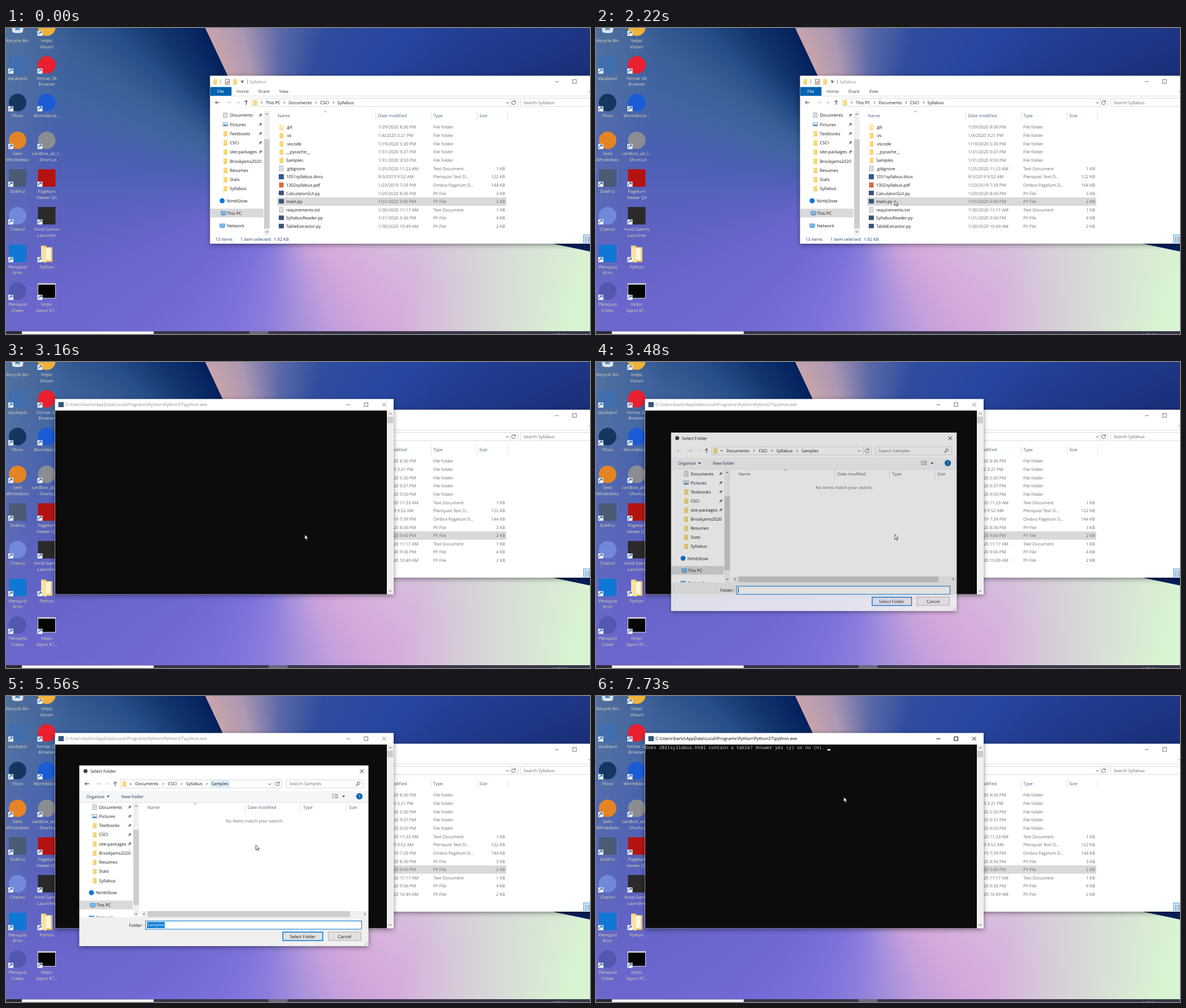
An HTML page for the animation above (8000 ms loop, 1032 px wide and 542 px high).

```html
<!DOCTYPE html>
<html lang="en">
<head>
<meta charset="utf-8">
<title>Folder picker demo</title>
<style>
html, body { margin: 0; width: 100%; height: 100%; overflow: hidden; background: #6a66cc; }
svg {
  display: block;
  background:
    linear-gradient(100deg, rgba(110,135,160,.4), rgba(110,135,160,0) 120px),
    conic-gradient(from 0deg at 484px 281px,
      #5a68a8 0deg, #2f4c9e 16deg, #2746a0 40deg, #1e3786 62deg, #14286e 76deg, #04205c 101.8deg,
      #d8cadc 101.9deg, #d6bedc 115deg, #d6b2dc 130deg, #d4a8dc 145deg,
      #c4a0dc 158deg, #a890dc 172deg, #8c7edc 185deg, #7c72da 200deg, #7069d4 225deg,
      #6a66cc 245deg, #5c62c0 262deg, #4a60b2 280deg, #4265a4 292deg, #3a5f98 303deg,
      #264e88 313deg, #123670 322deg, #03205c 334.8deg,
      #c8a4ac 334.9deg, #ac98b2 346deg, #5a68a8 360deg);
}
text { font: 7.65px "Open Sans", "Noto Sans", sans-serif; text-rendering: geometricPrecision; white-space: pre; }
.mono { font: 8.13px "Noto Sans Mono", "DejaVu Sans Mono", monospace; }
.win { filter: drop-shadow(0 2px 4px rgba(0,0,0,.45)); }
.desk { filter: drop-shadow(.6px .8px .6px rgba(0,0,0,.85)); }
</style>
</head>
<body>
<svg id="stage" width="1032" height="542" viewBox="0 0 1032 542"></svg>
<script>
const LOOP = 8000;
const GRAY = '#6d6d6d', HEAD = '#4c607a', INK = '#1a1a1a';

// Drawing helpers; text is placed by its vertical middle.
const txt = (x, y, s, fill = INK, more = '') => `<text x="${x}" y="${y + 2.8}" fill="${fill}" ${more}>${s}</text>`;
const mid = (x, y, s, fill = INK) => txt(x, y, s, fill, 'text-anchor="middle"');
const box = (x, y, w, h, fill, more = '') => `<rect x="${x}" y="${y}" width="${w}" height="${h}" fill="${fill}" ${more}/>`;
const frame = (x, y, w, h, stroke, fill = '#fff', sw = 1) =>
  box(x + .5, y + .5, w - 1, h - 1, fill, `stroke="${stroke}" stroke-width="${sw}"`);
const dot = (x, y, r, fill) => `<circle cx="${x}" cy="${y}" r="${r}" fill="${fill}"/>`;
const line = (d, stroke = '#555', w = 1) => `<path d="${d}" fill="none" stroke="${stroke}" stroke-width="${w}"/>`;
const fill = (d, c) => `<path d="${d}" fill="${c}"/>`;
const group = (id, body, more = '') => `<g id="${id}" ${more}>${body}</g>`;

const chevron = (x, y, dir, c = '#444', s = 2.2) => {
  const turn = { right: 0, down: 90, left: 180, up: 270 }[dir];
  return `<path transform="translate(${x} ${y}) rotate(${turn})" d="M${-s / 2} ${-s}L${s / 2} 0L${-s / 2} ${s}" fill="none" stroke="${c}"/>`;
};
const arrow = (x, y, dir, c = '#333') => {
  const turn = { left: 0, up: 90, right: 180 }[dir];
  return `<path transform="translate(${x} ${y}) rotate(${turn})" d="M4 0H-3.6M-.6 -3L-3.6 0L-.6 3" fill="none" stroke="${c}"/>`;
};
const caretDown = (x, y) => fill(`M${x - 2.5} ${y - 1.2}h5l-2.5 2.8z`, '#333');
const folder = (x, y, c = '#f8d775') => box(x - 3.5, y - 4.5, 7, 9, c) + box(x - 3.5, y - 4.5, 1.6, 9, '#fbe7a6') + box(x - 3.5, y + 3.8, 7, .8, '#e3b74c');
const page = (x, y) => frame(x - 3.7, y - 4.7, 7.5, 9.5, '#8a8f96', '#fff', .8) +
  line(`M${x - 2} ${y - 2}h4m-4 2h4m-4 2h4`, '#8a9db5', .7);
const picture = (x, y) => frame(x - 5, y - 4, 10, 7.5, '#8aa0b5', '#d8ecfb', .8) + fill(`M${x - 4} ${y + 2.5}l3 -3 2 1.6 1.5 -1 1.5 2.4z`, '#3f7fb0');
const screen = (x, y) => box(x - 4.5, y - 3.5, 9.5, 6.5, '#3f86c4') + box(x - 3.7, y - 2.8, 7.9, 5, '#79bdf0') + box(x - 2.5, y + 3.5, 5.5, 1, '#7a8794');
const refresh = (x, y) => line(`M${x + 2.6} ${y - 2}A3.3 3.3 0 1 0 ${x + 3.3} ${y + .4}M${x + 3.2} ${y - 4}v2.4h-2.4`, '#555');
const pin = (x, y) => line(`M${x - 3} ${y + 3}L${x} ${y}M${x - 2.4} ${y - 1}L${x + 1} ${y + 2.4}`, '#777', .9) +
  fill(`M${x - 1.6} ${y - .4}l2.4 -2.8 2.4 2.4 -2.8 2.4z`, '#777');
const crumbs = (y, ...items) => items.map(([x, s]) => s === '>' ? chevron(x, y, 'right', '#555', 2) : txt(x, y, s)).join('');
const controls = (id, y, ...xs) => `<g id="${id}" fill="none" stroke="#777">` +
  `<path d="M${xs[0]} ${y + .5}h7"/><rect x="${xs[1]}" y="${y - 3}" width="6.5" height="6.5"/>` +
  (xs[2] ? `<path d="M${xs[2]} ${y - 3}l6.5 6.5m0 -6.5l-6.5 6.5"/>` : '') + '</g>';

function desktop() {
  const shapes = {
    bin: (x, y) => fill(`M${x - 13} ${y - 16}h26l-4 25q-9 3 -18 0z`, '#dfe5ea') + fill(`M${x - 5} ${y + 5}l4 -8 6 8z`, '#3d8fd8'),
    round: (x, y, c, r = 15.5) => dot(x, y, r, c),
    square: (x, y, c, s = 31) => box(x - s / 2, y - s / 2, s, s, c),
    files: (x, y) => fill(`M${x - 10} ${y - 14}h8l2 3h10v26h-20z`, '#f0cb63') + box(x - 3, y - 10, 10, 22, '#fdf6dc') +
      fill(`M${x - 10} ${y - 13}l9 4v26l-9 -4z`, '#fbe29a'),
    shell: (x, y) => box(x - 16, y - 14, 32, 27, '#d5d8dc') + box(x - 15, y - 11.5, 30, 23.5, '#050505')
  };
  const cols = [
    [20.5, ['bin', '', 'Recycle Bin'], ['square', '#3f6fae', 'daubspot'], ['round', '#15365f', 'Ploov'],
      ['round', '#e58424', 'Seek', 'Wholedisks'], ['square', '#4c5b74', 'DokPut'], ['round', '#7289da', 'Chatvol'],
      ['square', '#0f78d4', 'Plenquist', 'Brim'], ['round', '#5257b0', 'Plenquist', 'Crews']],
    [72, ['round', '#efb23a', 'Velpic', 'Vistam'], ['round', '#e8202f', 'Fennar ZK', 'Browser'], ['round', '#1a5bd6', 'Wormblock...'],
      ['round', '#8b8d92', 'cardbox_ab_l...', '- Shortcut'], ['square', '#b31412', 'Pagelum', 'Viewer QX'],
      ['square', '#2b2a2b', 'Vond Games', 'Launcher'], ['files', '', 'Python'], ['shell', '', 'Velpic', 'Vapor KT...']]
  ];
  let art = '', names = '';
  for (const [x, ...icons] of cols) icons.forEach(([kind, color, a, b], row) => {
    const y = -1.5 + 66.8 * row;
    art += shapes[kind](x, y, color);
    if (kind !== 'bin') {
      const left = x - 16.5;
      art += box(left, y + 6.5, 9, 9, '#f4f6f8') + line(`M${left + 2} ${y + 13.5}q0 -4 4 -4M${left + 4} ${y + 8.2}h3v3`, '#1d62b5', 1.2);
    }
    names += mid(x, y + 23.5, a, '#fff') + (b ? mid(x, y + 34.2, b, '#fff') : '');
  });
  return art + `<g class="desk">${names}</g>`;
}

// Navigation pane, shared by the file window and the dialog.
function sidebar(bottom, thumbTop, thumbEnd) {
  const items = ['Documents', 'Pictures', 'Textbooks', 'CSCI', 'site-packages', 'Brookjams2020', 'Resumes', 'Stats', 'Syllabus'];
  const rows = items.map((s, i) => {
    const y = 154.5 + 16.25 * i, icon = [page, picture][i] || folder;
    return icon(387.5, y) + txt(395.5, y, s) + (i < 5 ? box(444.5, y - 6, 11, 12, '#fff') + pin(449.5, y) : '');
  }).join('');
  return rows + dot(382, 306, 4.5, '#0f78d4') + txt(390, 306.3, 'NimbStow') +
    box(361, 320, 94, 15.5, '#d9d9d9') + screen(384, 328) + txt(390.5, 328, 'This PC') +
    screen(382, 350) + txt(390.5, 350, 'Network') +
    box(456, 147, 10, bottom - 147, '#f0f0f0') + box(456, thumbTop, 10, thumbEnd - thumbTop, '#cdcdcd') +
    chevron(461, 152.5, 'up') + chevron(461, bottom - 6, 'down');
}

function explorer() {
  const kinds = { d: 'File folder', t: 'Text Document', w: 'Plenquist Text D...', a: 'Ombra Pagelum D...', p: 'PY File' };
  const files = [
    ['d', '.git', '1/29/2020 8:36 PM'], ['d', '.vs', '1/4/2020 3:21 PM'], ['d', '.vscode', '1/19/2020 5:30 PM'],
    ['d', '__pycache__', '1/31/2020 9:37 PM'], ['d', 'Samples', '1/31/2020 9:50 PM'],
    ['t', '.gitignore', '1/25/2020 11:23 AM', 1], ['w', '1051syllabus.docx', '9/3/2019 9:52 AM', 122],
    ['a', '1302syllabus.pdf', '1/23/2019 7:39 PM', 144], ['p', 'CalculatorGUI.py', '1/29/2020 8:36 PM', 3],
    ['p', 'main.py', '1/31/2020 9:40 PM', 2], ['t', 'requirements.txt', '1/30/2020 11:17 AM', 1],
    ['p', 'SyllabusReader.py', '1/31/2020 9:36 PM', 4], ['p', 'TableExtractor.py', '1/30/2020 10:49 AM', 2]
  ];
  const icons = {
    d: folder, t: page,
    w: (x, y) => box(x - 4.5, y - 4.5, 9, 9, '#2b579a'),
    a: (x, y) => box(x - 4, y - 4.5, 8, 9, '#d9693f'),
    p: (x, y) => box(x - 4.5, y - 4.5, 9, 8, '#35557c')
  };
  const rows = files.map(([k, name, date, kb], i) => {
    const y = 175.6 + 14.64 * i;
    return icons[k](486.5, y, i ? undefined : '#fbe9b0') + txt(495, y, name) + txt(657.5, y, date, GRAY) + txt(755, y, kinds[k], GRAY) +
      (kb ? txt(882, y, kb + ' KB', GRAY, 'text-anchor="end"') : '');
  }).join('');
  return box(360.5, 84.5, 690, 297.5, '#fff', 'class="win"') +
    folder(369.5, 95) + line('M379.5 91v8M426.5 91v8', '#999') + frame(387, 90.5, 8.5, 9.5, '#777') +
    line('M389 95.5l2 2 3.5 -4', '#d2532f', 1.2) + folder(404.5, 95) + line('M415 93.5h5', '#333', .8) + caretDown(417.5, 96) +
    `<g id="exTitle">${txt(430.5, 95, 'Syllabus', 'inherit')}</g>` + controls('exBtns', 94.5, 970, 1001.5) +
    box(361, 104.5, 37.5, 15.5, '#0063b1') + mid(379.3, 112.5, 'File', '#fff') +
    txt(407.5, 112.5, 'Home', '#444') + txt(445.5, 112.5, 'Share', '#444') + txt(482.5, 112.5, 'View', '#444') +
    line('M361 120.5h671', '#dcddde') + chevron(1031.5, 112.5, 'down', '#777') +
    arrow(373.5, 132, 'left') + arrow(394, 132, 'right', '#ccc') + chevron(410.5, 132, 'down', '#666', 1.9) + arrow(424.5, 132, 'up') +
    frame(434, 124, 471, 15.5, '#d9d9d9') + line('M891.5 124v15', '#d9d9d9') + folder(440, 132) +
    crumbs(132, [452, '>'], [459, 'This PC'], [492, '>'], [499.5, 'Documents'], [548, '>'], [555, 'CSCI'], [579, '>'], [585.5, 'Syllabus']) +
    chevron(886, 132.5, 'down') + refresh(897, 132.2) + frame(909, 124, 140, 15.5, '#d9d9d9') + txt(914.5, 132, 'Search Syllabus', GRAY) +
    txt(480.5, 155, 'Name', HEAD) + txt(657.5, 155, 'Date modified', HEAD) + txt(755, 155, 'Type', HEAD) + txt(836.5, 155, 'Size', HEAD) +
    chevron(564.5, 148, 'up', '#777') + line('M653.5 147v17M751.5 147v17M832.5 147v17M886.5 147v17', '#e3e3e3') +
    box(479, 300, 405, 14.8, '#d9d9d9', 'id="picked"') + rows + sidebar(367, 197, 355) +
    txt(370, 374.3, '13 items', '#26436a') + txt(414, 374.3, '1 item selected', '#26436a') + txt(473, 374.3, '1.92 KB', '#26436a') +
    frame(1020, 366, 20, 14.5, '#4ba3dc', '#cce8ff') + line('M1023 371h3m1.5 0h5M1023 374h3m1.5 0h5M1023 377h3m1.5 0h5', '#667');
}

function terminal() {
  return box(86.5, 65.5, 598.5, 346, '#fff', 'class="win"') + box(87, 86, 586, 325.3, '#0c0c0c') +
    box(92.5, 71, 9.5, 9, '#35557c') +
    `<g id="conTitle">${txt(105, 75.6, 'C:\\Users\\barlo\\AppData\\Local\\Programs\\Python\\Python37\\python.exe', 'inherit')}</g>` +
    controls('conBtns', 75.3, 601.5, 633, 665) +
    box(673, 86, 11.5, 325.3, '#f0f0f0') + box(673.5, 97, 10.5, 11.5, '#cdcdcd') + chevron(679, 91.5, 'up') + chevron(679, 405.5, 'down') +
    `<text id="prompt" class="mono" x="87" y="94.3" fill="#ccc">Does 2021syllabus.html contain a table? Answer yes (y) or no (n). </text>` +
    box(87, 94, 5, 2.6, '#f2f2f2', 'id="block"');
}

function dialog() {
  return box(129.5, 123, 511, 320, '#fff', 'class="win"') +
    group('dlgIcon', dot(140.5, 133, 3.6, '#3a4450')) + txt(149, 133.2, 'Select Folder') + line('M625.5 130l6.5 6.5m0 -6.5l-6.5 6.5', '#222') +
    group('back', arrow(143, 155.5, 'left', 'inherit')) + arrow(163, 155.5, 'right', '#ccc') + chevron(179, 155.5, 'down', '#aaa', 1.9) + arrow(193, 155.5, 'up') +
    frame(202, 148, 286, 15.5, '#d9d9d9') + line('M473.5 148v15', '#d9d9d9') + folder(209, 155.5) + txt(218, 154.8, '«') +
    box(361, 149, 35, 13.5, '#ddf0fb', 'id="crumb"') +
    crumbs(155.5, [228.5, 'Documents'], [278, '>'], [286, 'CSCI'], [310.5, '>'], [318, 'Syllabus'], [355, '>'], [363, 'Samples']) +
    chevron(466, 156, 'down') + refresh(480, 155.7) + frame(495, 148, 137, 15.5, '#d9d9d9') + txt(501, 155.5, 'Search Samples', GRAY) +
    `<circle cx="623" cy="154.5" r="2.4" fill="none" stroke="#555"/>` + line('M621.3 156.4l-3 3', '#555', 1.2) +
    box(130, 168, 510, 20, '#f5f6f7') + line('M130 188.5h510', '#e2e3e4') +
    txt(142, 177.7, 'Organize', '#1e395b') + caretDown(180.5, 178) + txt(204, 177.7, 'New folder', '#1e395b') +
    line('M576.5 174.5h3m1.5 0h6M576.5 177.5h3m1.5 0h6M576.5 180.5h3m1.5 0h6', '#667') + caretDown(596.5, 178) +
    dot(624.5, 177.7, 5.6, '#0c66b5') + mid(624.5, 177.7, '?', '#fff') +
    `<g clip-path="url(#pane)"><g transform="translate(-231 42.4)">${sidebar(349.6, 194.6, 327.6)}</g></g>` +
    txt(250, 197.3, 'Name', HEAD) + txt(427, 197.3, 'Date modified', HEAD) + txt(525, 197.3, 'Type', HEAD) + txt(606, 197.3, 'Size', HEAD) +
    chevron(334.5, 190.5, 'up', '#777') + line('M422.5 189v18M520.5 189v18M601.5 189v18', '#e3e3e3') +
    mid(439.3, 221, 'No items match your search.', GRAY) +
    box(238, 381, 402, 10.5, '#f0f0f0') + box(250, 381, 358, 10.5, '#cdcdcd') + chevron(244, 386, 'left') + chevron(634, 386, 'right') +
    box(130, 391.8, 510, 51, '#f0f0f0') + txt(242, 405.8, 'Folder:', INK, 'text-anchor="end"') + frame(246, 398, 383, 15.5, '#0078d7') +
    box(249, 400.3, 31.5, 10.7, '#0078d7', 'id="mark"') + group('entry', txt(249.5, 405.5, 'Samples', 'inherit')) +
    box(249.5, 400.5, .9, 10, '#000', 'id="caret"') +
    `<rect id="okBtn" x="489.3" y="418.3" width="70.4" height="14.9" fill="#e1e1e1" stroke="#0078d7" stroke-width="1.5"/>` + mid(524.3, 425.7, 'Select Folder') +
    frame(569, 417.5, 59, 16, '#adadad', '#e1e1e1') + mid(598.5, 425.7, 'Cancel') +
    line('M638 436v1.2m0 1v1.2m0 1v1.2M635.8 438.2v1.2m0 1v1.2M633.6 440.4v1.2', '#aaa', 1.2);
}

const taskbar = box(0, 537, 1032, 5, '#393649') + box(0, 537, 28, 5, '#2a2a35') + box(28, 537.4, 233, 4.6, '#f5f5f6') +
  box(430, 537, 33.5, 5, '#6c687c', 'id="task"') + txt(965, 544.3, '9:57 PM', '#fff');

// Green glow in the lower right part of the wallpaper.
const glow = '<linearGradient id="glow" gradientUnits="userSpaceOnUse" x1="730" y1="400" x2="1010" y2="490">' +
  '<stop stop-color="#d8f4d2" stop-opacity="0"/><stop offset="1" stop-color="#d8f4d2"/></linearGradient>';

document.getElementById('stage').innerHTML =
  `<defs><clipPath id="pane"><rect x="130" y="189" width="106" height="202.8"/></clipPath>${glow}</defs>` +
  fill('M484 281L1032 396V537H484z', 'url(#glow)') +
  desktop() + explorer() + taskbar + group('con', terminal()) + group('dlg', dialog()) +
  `<path id="mouse" d="M0 0V8.6L2 6.8L3.5 10L4.9 9.4L3.5 6.3H6.2Z" fill="#fff" stroke="#111" stroke-width=".75"/>`;

const el = {};
document.querySelectorAll('[id]').forEach(n => el[n.id] = n);
const set = (id, name, value) => el[id].setAttribute(name, value);
const show = (id, on) => set(id, 'visibility', on ? 'inherit' : 'hidden');
const span = (t, a, b) => Math.min(1, Math.max(0, (t - a) / (b - a)));
const easeOut = p => 1 - (1 - p) ** 3;
const smooth = p => p * p * (3 - 2 * p);

// Mouse path: time, x, y of the tip.
const path = [
  [0, 955, 546], [200, 955, 546], [810, 527, 302], [960, 527, 302], [1070, 527, 304.2], [1300, 527, 304.2], [1330, 528, 305.7],
  [3960, 528, 305.7], [4810, 386, 156], [4940, 370, 158], [5130, 370, 158], [5560, 441.5, 264],
  [5640, 441.5, 264], [5890, 508, 415.5], [6090, 514.5, 425], [7110, 514.5, 425], [7700, 437.8, 179], [LOOP, 437.8, 179]
];
function mouseAt(t) {
  const i = path.findIndex(k => k[0] > t);
  const [t0, x0, y0] = path[i - 1], [t1, x1, y1] = path[i];
  const p = smooth(span(t, t0, t1));
  return [x0 + (x1 - x0) * p, y0 + (y1 - y0) * p];
}
function zoom(id, cx, cy, scale, opacity) {
  set(id, 'transform', `translate(${cx} ${cy}) scale(${scale}) translate(${-cx} ${-cy})`);
  set(id, 'opacity', opacity);
}

function render(t) {
  set('mouse', 'transform', `translate(${mouseAt(t).join(' ')})`);

  const exActive = t >= 1830 && t < 2150;
  set('exTitle', 'fill', exActive ? '#000' : '#8a8a8a');
  set('exBtns', 'stroke', exActive ? '#000' : '#777');
  set('picked', 'fill', exActive ? '#cce8ff' : '#d9d9d9');
  show('task', t < 2150 || t >= 2270);
  set('task', 'x', t < 2270 ? 430 : 464);

  const grow = easeOut(span(t, 2250, 2480));
  show('con', t >= 2270);
  zoom('con', 385.5, 238.5, .9 + .1 * grow, grow);
  const asked = t >= 6600;
  const conActive = t < 3160 || asked;
  set('conTitle', 'fill', conActive ? '#000' : '#8a8a8a');
  set('conBtns', 'stroke', conActive ? '#000' : '#777');
  show('prompt', asked);
  set('block', 'x', asked ? 409 : 87);
  show('block', (t >= 2660 && t < 3160) || (t >= 6650 && t < 7160) || t >= 7680);

  const open = easeOut(span(t, 3390, 3570)), close = span(t, 6340, 6510);
  show('dlg', t >= 3410 && close < 1);
  zoom('dlg', 385, 283, .9 + .1 * open - .063 * close, open * Math.max(0, 1 - 1.7 * close));
  const entered = t >= 5130, chosen = t >= 6250;
  show('dlgIcon', close === 0);
  el.back.firstElementChild.setAttribute('stroke', entered ? '#333' : '#ccc');
  show('crumb', entered && !chosen);
  show('entry', entered);
  show('mark', entered && !chosen);
  set('entry', 'fill', chosen ? INK : '#fff');
  show('caret', !entered && (t < 4060 || t >= 4590));
  set('okBtn', 'fill', t >= 6200 ? '#cce4f7' : t >= 5950 ? '#e5f1fb' : '#e1e1e1');
}

const start = performance.now();
function tick() {
  render((performance.now() - start) % LOOP);
  requestAnimationFrame(tick);
}
tick();
</script>
</body>
</html>
```
